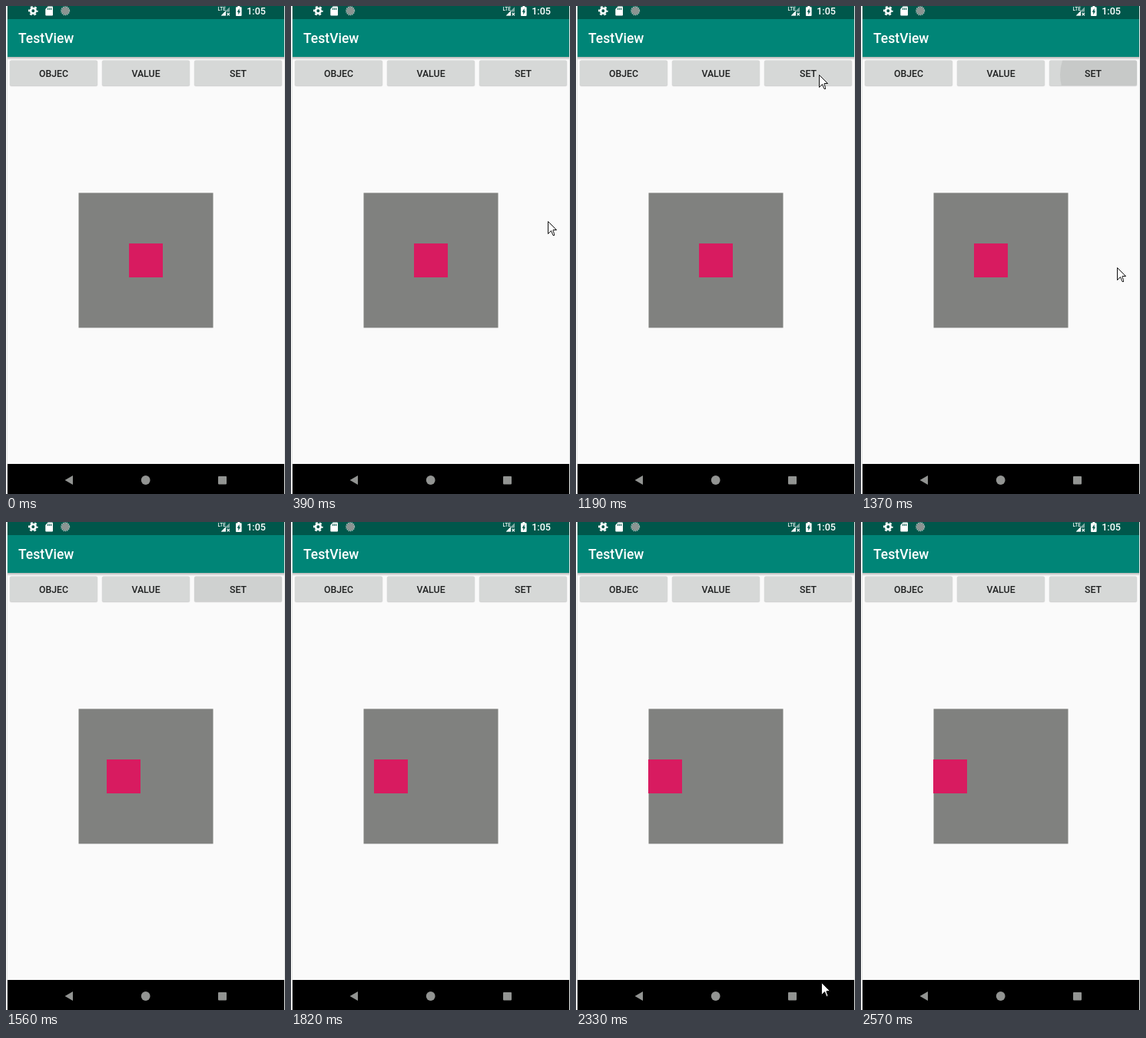
Recreate the animation shown at these times as an HTML page. Size 363 px wide and 633 px high, loop 3.2 s.

```html
<!DOCTYPE html>
<html lang="en">
<head>
<meta charset="utf-8">
<title>TestView</title>
<style>
  html, body { margin: 0; width: 100%; height: 100%; overflow: hidden; background: #fafafa; }
  svg { display: block; width: 363px; height: 633px; }
  text { font-family: Roboto, "Liberation Sans", sans-serif; font-weight: 500; }
  .label { font-size: 12.3px; fill: #1f2121; text-anchor: middle; }
</style>
</head>
<body>
<svg viewBox="0 0 363 633">
  <defs>
    <linearGradient id="shade" x2="0" y2="1">
      <stop offset="0" stop-color="#000" stop-opacity=".28"/>
      <stop offset="1" stop-color="#000" stop-opacity="0"/>
    </linearGradient>
    <clipPath id="setClip"><rect x="245" y="70.5" width="114" height="32.5" rx="2"/></clipPath>
  </defs>

  <rect width="363" height="633" fill="#fafafa"/>
  <rect x="2" width="360" height="17" fill="#00574b"/>
  <rect x="2" y="17" width="360" height="49" fill="#008577"/>
  <rect x="2" y="66" width="360" height="4" fill="url(#shade)"/>
  <rect x="2" y="594" width="360" height="39" fill="#000"/>
  <path d="M1.5 0V633M362.5 0V633" stroke="#e4e6e5"/>

  <!-- status bar -->
  <g fill="#fff">
    <circle cx="35.3" cy="6.3" r="3.3" fill="none" stroke="#fff" stroke-width="2.7"/>
    <circle cx="35.3" cy="6.3" r="5.3" fill="none" stroke="#fff" stroke-width="2"
      stroke-dasharray="2.8 2.75" stroke-dashoffset="1.4"/>
    <path d="M54.6 .6H60a1 1 0 0 1 1 1V11.6a1 1 0 0 1-1 1H52.3a1 1 0 0 1-1-1V4Z"/>
    <path d="M54.6 2.4V5M56.7 2.4V5M58.8 2.4V5" stroke="#00574b" stroke-width="1.1"/>
    <circle cx="77.2" cy="6.3" r="5" fill="#8b9492"/>
    <circle cx="77.2" cy="6.3" r="5.4" fill="none" stroke="#d5dad8" stroke-width="1.2" stroke-dasharray="1.2 1.2"/>
    <text x="275.5" y="6" font-size="6.5">LTE</text>
    <path d="M291 1.2V7.5H286V12.4H279.6Z" fill="#7fa9a3"/>
    <path d="M286 6.2V12.4H279.8Z"/>
    <path d="M287.6 9 291 12.4M291 9 287.6 12.4" stroke="#fff" stroke-width="1.1"/>
    <path d="M301.4 0H304.2V1.2H305.6a1 1 0 0 1 1 1V12a1 1 0 0 1-1 1H300a1 1 0 0 1-1-1V2.2a1 1 0 0 1 1-1H301.4Z"/>
    <path d="M303.6 3 300.7 7.7H302.3V11.2L305 6.4H303.6Z" fill="#00574b"/>
    <text x="313.2" y="11" font-size="12.6">1:05</text>
    <text x="16" y="48.4" font-size="17.5">TestView</text>
  </g>

  <g id="buttons"></g>
  <g clip-path="url(#setClip)"><circle id="ripple" cx="316" cy="89" r="0"/></g>
  <g class="label">
    <text x="62" y="92">OBJEC</text>
    <text x="182" y="92">VALUE</text>
    <text x="302" y="92">SET</text>
  </g>

  <rect x="94.5" y="242.4" width="175" height="175" fill="#80817f"/>
  <rect id="box" x="160" y="308" width="44" height="44" fill="#d81b60"/>

  <g fill="#929492">
    <path d="M76.6 615 87 609V621Z"/>
    <circle cx="181.7" cy="615" r="5.9"/>
    <rect x="276" y="610" width="11" height="10.4" rx=".8"/>
  </g>

  <path id="cursor" d="M.5 .5V16.5L4.5 12.5 7 18.5H8.5V16.5L7 12.5V11.5H11.5Z"
    fill="#fff" stroke="#111" visibility="hidden"/>
</svg>
<script>
const LOOP = 3200, REST = 700, PRESS = 1177;
const $ = id => document.getElementById(id);
const clamp = v => Math.max(0, Math.min(1, v));

$('buttons').innerHTML = [5, 125, 245].map(x => `
  <rect x="${x - .5}" y="70.5" width="115" height="34" rx="2.5" opacity=".07"/>
  <rect x="${x}" y="71" width="114" height="33" rx="2" opacity=".09"/>
  <rect x="${x}" y="70.5" width="114" height="32.5" rx="2" fill="#d6d8d7"/>`).join('');

// pointer strokes: quadratic curves, hidden in between
const strokes = [
  { from: 140, to: REST, x: [297, 370, 316], y: [550, 112, 86] },
  { from: PRESS, to: 1497, x: [316, 334, 339], y: [89, 260, 565] },
  { from: 1870, to: 2190, x: [312, 250, 300], y: [593, 64, 560] },
  { from: 2315, to: 2510, x: [319, 302, 287], y: [597, 607, 624] }
];
const curve = ([a, b, c], p) =>
  Math.round(a * (1 - p) ** 2 + 2 * b * p * (1 - p) + c * p * p);

// the screen refreshes in steps and rests before the press
const snap = (t, origin, step) => origin + Math.floor((t - origin) / step) * step;
const tick = t => t < PRESS ? Math.min(REST, snap(t, 0, 70)) : snap(t, PRESS, 63.3);

function boxX(t) {
  const ease = (1 - Math.cos(Math.PI * clamp((t - 1050) / 1090))) / 2;
  const lag = clamp((t - PRESS) / 180);
  return Math.round(160 - 65.6 * ease * lag);
}

function draw(time) {
  const t = tick(time);
  $('box').setAttribute('x', boxX(t));
  $('ripple').setAttribute('r', 75 * clamp((t - PRESS) / 250));
  $('ripple').setAttribute('opacity', .08 * clamp((1690 - t) / 360));

  const s = strokes.find(s => t >= s.from && t <= s.to);
  $('cursor').setAttribute('visibility', s ? 'visible' : 'hidden');
  if (s) {
    const p = (t - s.from) / (s.to - s.from);
    $('cursor').setAttribute('transform', `translate(${curve(s.x, p)} ${curve(s.y, p)})`);
  }
}

const start = performance.now();
function frame() {
  draw((performance.now() - start) % LOOP);
  requestAnimationFrame(frame);
}
frame();
</script>
</body>
</html>
```
